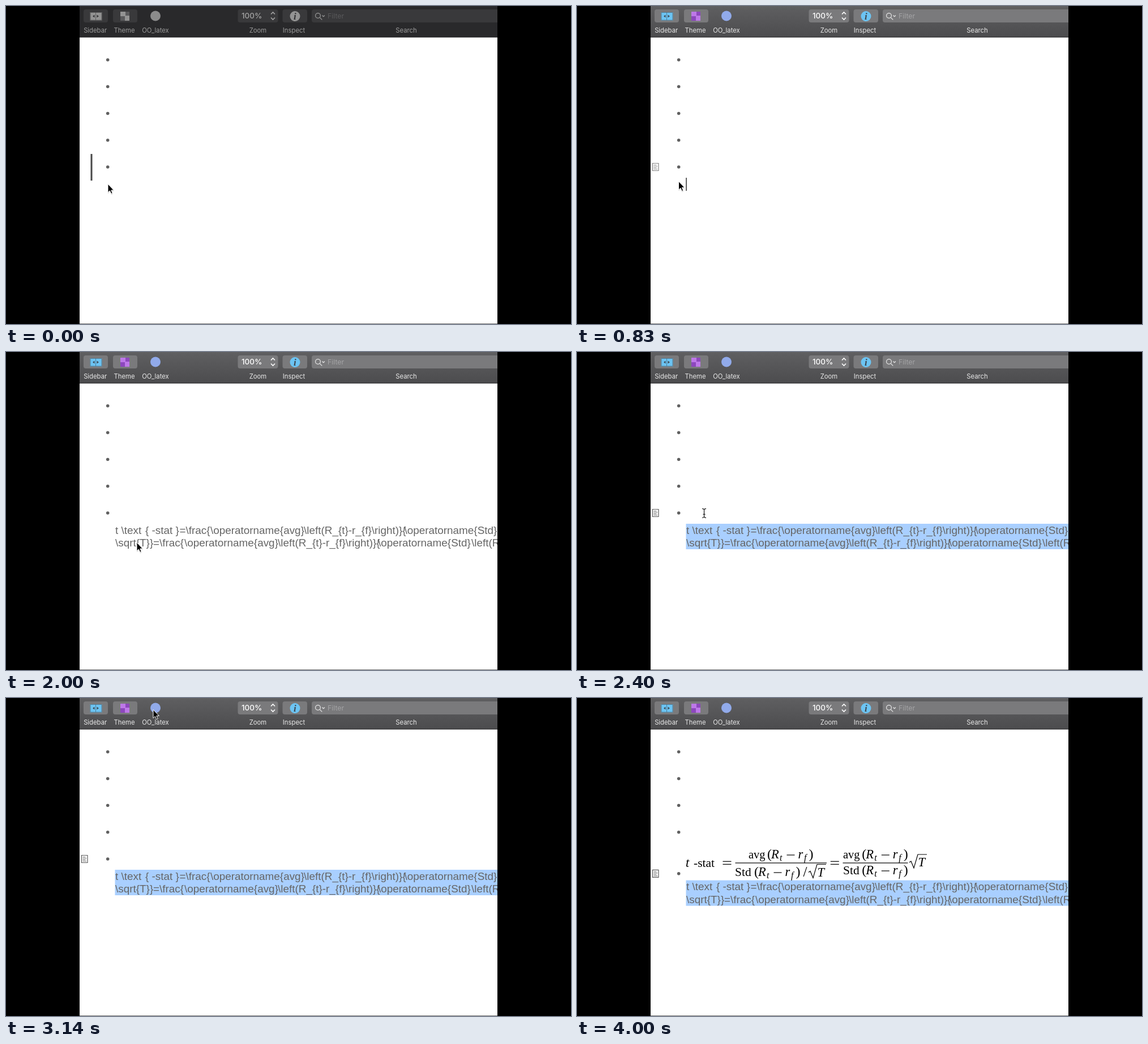
These frames come from a looping animation (998x561 px, 4.9 s). An HTML page:

```html
<!DOCTYPE html>
<html lang="en">
<head>
<meta charset="utf-8">
<title>Outline formula</title>
<style>
html, body { margin: 0; width: 100%; height: 100%; overflow: hidden; background: #000; }
svg {
  display: block; width: 998px; height: 561px;
  --top: #5f5f61; --low: #4c4c4e; --btn: #7a7a7c; --label: #e9e9e9; --strong: #fff;
  --hint: #a4a4a6; --blue: #6cc4f3; --purple: #bd78e8; --purple2: #8d48bd; --script: #91aaea; --ink: #3f4a55;
}
svg.off {
  --top: #29292b; --low: #29292b; --btn: #39393b; --label: #9b9b9b; --strong: #a4a4a4;
  --hint: #59595b; --blue: #939393; --purple: #939393; --purple2: #5a5a5c; --script: #8b8b8b; --ink: #343436;
}
.ui { font: 11.3px Inter, "Open Sans", sans-serif; fill: var(--label); }
.code { font: 18.9px "Liberation Sans", Arial, sans-serif; fill: #666; white-space: pre; }
.math { font: 21.5px "Liberation Serif", Times, serif; }
.math i, .it { font-style: italic; }
</style>
</head>
<body>
<svg id="stage" viewBox="0 0 998 561">
  <defs>
    <linearGradient id="bar" x2="0" y2="1">
      <stop style="stop-color:var(--top)"/><stop offset="1" style="stop-color:var(--low)"/>
    </linearGradient>
    <clipPath id="win"><path d="M130 0H868V561H130Z"/></clipPath>
  </defs>
  <rect width="998" height="561"/>
  <g clip-path="url(#win)">
    <rect x="130" y="55" width="738" height="505" fill="#fff"/>
    <rect x="130" y="560" width="738" height="1" fill="#777"/>
    <rect x="130" width="738" height="55" fill="url(#bar)"/>
    <rect x="130" y="54.5" width="738" height="1" fill="#1c1c1e"/>
    <g id="tools" class="ui"></g>
    <g id="dots" fill="#606060"></g>
    <rect id="focus" x="149.5" y="261" width="3" height="47" fill="#484848"/>
    <g id="note" fill="none" stroke="#5c5c5c">
      <path stroke-width="1.2" d="M133.5 277.5h10.5v13h-10.5Z"/>
      <path stroke-width=".9" d="M135.5 280.5h5M135.5 283h6.5M135.5 285.5h5M135.5 288h6.5"/>
    </g>
    <g id="code" class="code">
      <rect id="mark" x="192.5" y="303" width="676" height="45" fill="#a9cfff"/>
    </g>
    <g id="math" class="math"></g>
    <rect id="caret" x="192.4" width="1.4" fill="#222"/>
    <path id="press" d="M240 5h48v44h-48Z" fill="#000" opacity=".3"/>
    <g id="arrow">
      <path d="M0 2V17L3.5 13.8 6 19 8.5 18 6.2 12.6H11Z" fill="#000" opacity=".18"/>
      <path d="M0 0V15L3.4 11.9 5.9 17.3 8.2 16.3 5.9 11H10.4Z" stroke="#fff" stroke-width="1"/>
    </g>
    <path id="beam" d="M-3.5 -8Q0 -8 0 -5.5Q0 -8 3.5 -8M0 -6V6M-3.5 8Q0 8 0 5.5Q0 8 3.5 8M-2 2H2" fill="none" stroke="#222" stroke-width="1.3"/>
  </g>
</svg>
<script>
const $ = id => document.getElementById(id);
const add = (id, markup) => $(id).insertAdjacentHTML("beforeend", markup);
const text = (x, y, s, attrs = "") => `<text x="${x}" y="${y}" ${attrs}>${s}</text>`;
const show = (id, on) => $(id).setAttribute("visibility", on ? "visible" : "hidden");
const move = (id, x, y) => $(id).setAttribute("transform", `translate(${x} ${y})`);

// Toolbar
const button = (x, w) => `<rect x="${x}" y="6" width="${w}" height="23" rx="4" fill="var(--btn)"/>`;
const label = (x, s) => text(x, 47, s, 'text-anchor="middle"');
add("tools", button(137, 43) + button(189, 43) + button(409.5, 71) + button(488.5, 43.5) + button(540, 340) +
  label(157.7, "Sidebar") + label(209, "Theme") + label(264, "OO_latex") +
  label(445, "Zoom") + label(508.5, "Inspect") + label(707, "Search") +
  `<path d="M148.5 11h21v14.500h-21Z" fill="var(--blue)"/>
   <path d="M158.500 11.500v13.500M149 11.500h20v13.500h-20Z" fill="none" stroke="var(--ink)" stroke-opacity=".55"/>
   <path d="M156.500 15.500v5l-3.500-2.500ZM160.500 15.500v5l3.500-2.500Z" fill="var(--ink)"/>
   <path d="M202 10h16v16h-16Z" fill="var(--purple)"/>
   <path d="M211 10h7v7h-7ZM202 18h8v8h-8Z" fill="var(--purple2)"/>
   <circle cx="264" cy="17.500" r="9" fill="var(--script)"/>
   <path d="M468 14.500l3.500-3.500 3.500 3.500M468 20.500l3.500 3.500 3.500-3.500" fill="none" stroke="var(--strong)" stroke-width="1.600"/>
   <circle cx="510.500" cy="18" r="9" fill="var(--blue)"/>
   <g fill="none" stroke="var(--label)" stroke-width="1.200"><circle cx="551" cy="17" r="4.400"/>
   <path d="M554.300 20.300l4 4M558.500 16.500l2.200 2.200 2.200-2.200"/></g>` +
  text(416, 22.3, "100%", 'font-size="13.500" font-weight="500" style="fill:var(--strong)"') +
  text(510.3, 23.5, "i", 'text-anchor="middle" style="font:italic bold 17px Liberation Serif,serif;fill:var(--ink)"') +
  text(568, 21.5, "Filter", 'font-size="12.300" style="fill:var(--hint)"'));

// Outline rows
for (let i = 0; i < 5; i++)
  add("dots", `<circle id="dot${i}" cx="179.700" cy="${95 + 47.25 * i}" r="2.800"/>`);

const run = (y, parts) => parts.map(([x, s]) => text(x, y, s)).join("");
const ratio = "\\left(R_{t}-r_{f}\\right)}{";
add("code",
  run(320.7, [[193, "t \\text"], [246, "{ -stat }"], [306.5, "=\\frac{"], [361, "\\operatorname{avg}"],
    [526, ratio], [703.5, "\\operatorname{Std}"]]) +
  run(343.3, [[193, "\\sqrt{T}}"], [260, "=\\frac{"], [315, "\\operatorname{avg}"],
    [480, ratio], [657, "\\operatorname{Std}"], [822, "\\left(R_{t}"]]));

// Typeset formula
const it = (x, y, s, size = 22.5) => text(x, y, s, `class="it" font-size="${size}"`);
const line = (x, y, w) => `<rect x="${x}" y="${y - .6}" width="${w}" height="1.200"/>`;
const excess = (x, y) => text(x, y, "(", 'font-size="24"') + it(x + 7, y, "R") + it(x + 22, y + 3.5, "t", 16) +
  line(x + 34.5, y - 6, 14) + it(x + 54.5, y, "r") + it(x + 65, y + 3.5, "f", 16) + text(x + 73.5, y, ")", 'font-size="24"');
const root = (x, y) => `<path d="M${x} ${y - 7}l3-2 5 12 7-24h16" fill="none" stroke="#000" stroke-width="1.200"/>` +
  it(x + 15.5, y, "T");
const equals = x => line(x, 288.3, 15) + line(x, 293.4, 15);
add("math", it(192, 297.5, "t") + text(206, 297.5, "-stat") + equals(257.5) +
  text(303, 283, "avg", 'font-size="20.500"') + excess(336, 283) + line(279.5, 291, 161.5) +
  text(279, 314, "Std") + excess(313, 314) + text(399.5, 315, "/", 'font-size="25"') + root(409, 314.5) +
  equals(447.8) + text(470, 283, "avg", 'font-size="20.500"') + excess(503.3, 283) + line(469.5, 291, 115) +
  text(470, 311, "Std") + excess(503.3, 311) + root(587, 297));

const path = [[100, 180, 314], [200, 159, 302], [400, 140, 286], [600, 137, 283], [710, 137, 283],
  [830, 179, 309], [930, 231, 336], [2150, 231, 336], [2370, 224.5, 285], [2400, 224.5, 285],
  [2870, 259, 19], [2940, 260, 20.5], [3340, 260, 20.5], [3670, 687, 340]];
const ramp = (t, a, b) => Math.min(1, Math.max(0, (t - a) / (b - a)));
const within = (t, a, b) => t >= a && t < b;

function pointer(t) {
  const k = path.findIndex(p => p[0] > t);
  if (k < 1) return path.at(k).slice(1);
  const [a, x, y] = path[k - 1], [b, u, v] = path[k], f = ramp(t, a, b);
  return [x + (u - x) * f, y + (v - y) * f];
}

function draw() {
  const t = performance.now() % 4900;
  const done = t >= 4000, beam = within(t, 2280, 2440) || t >= 3580;
  const [x, y] = t < 100 ? [180, 314] : pointer(t);
  $("stage").classList.toggle("off", t < 100);
  move("arrow", x, y);
  move("beam", x, y);
  show("arrow", !beam);
  show("beam", beam && !done);
  show("focus", t < 710);

  const high = t < 710;
  $("caret").setAttribute("y", high ? 265 : 303);
  $("caret").setAttribute("height", high ? 38 : 23);
  show("caret", within(t, 130, 1300) || within(t, 1870, 2000));

  $("note").setAttribute("opacity", t < 1870 ? ramp(t, 350, 500) * (1 - ramp(t, 800, 920)) : ramp(t, 2250, 2370));
  show("code", t >= 2000);
  $("mark").setAttribute("opacity", t >= 2200 ? 1 : 0);
  show("math", done);
  show("press", within(t, 2940, 3140));
  move("code", 0, done ? 18.6 : 0);
  move("note", 0, done ? 25.8 : 0);
  move("dot4", 0, done ? 25.8 : 0);
  requestAnimationFrame(draw);
}
draw();
</script>
</body>
</html>
```
